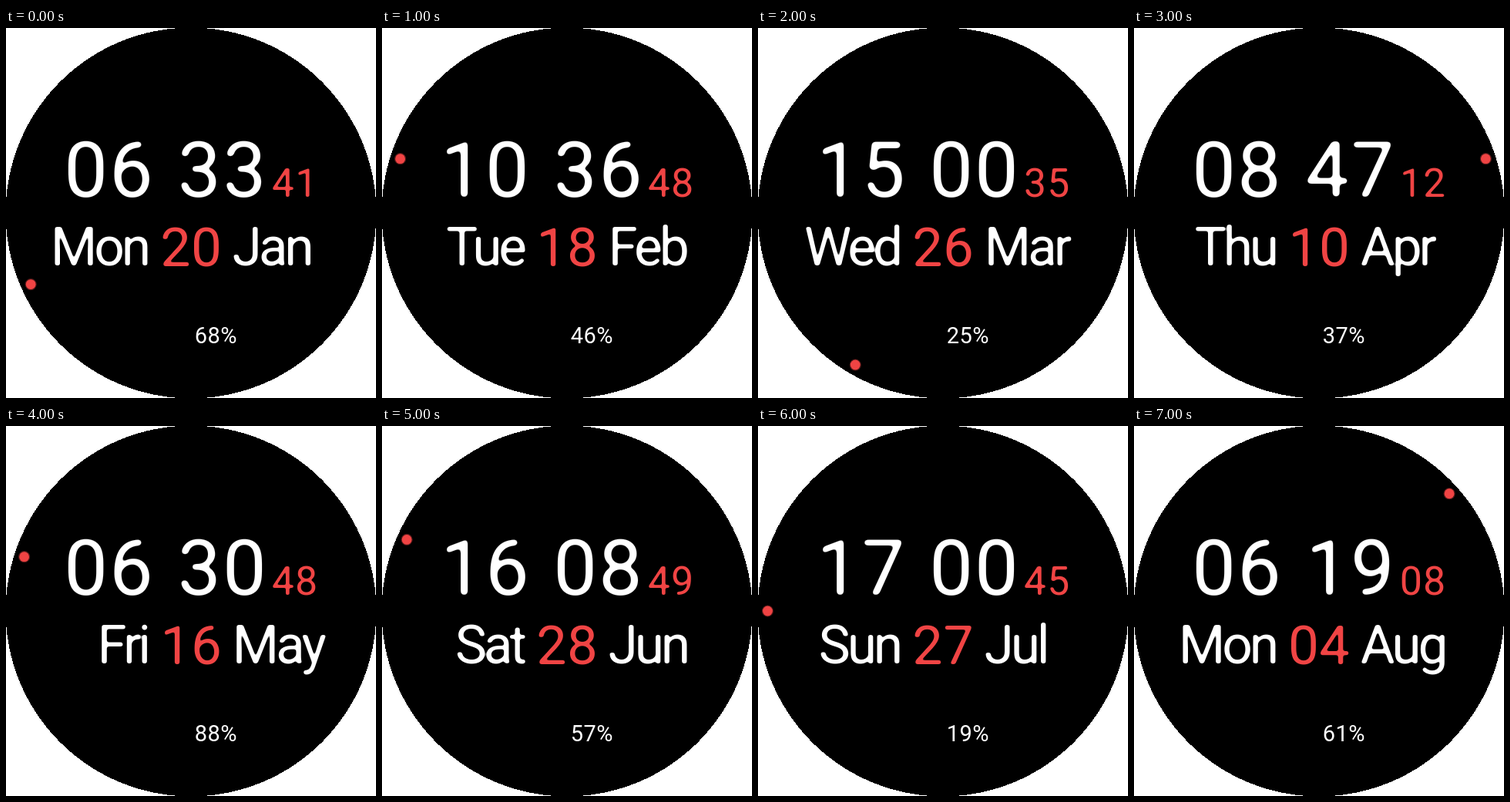
An HTML page that plays this animation: 480 by 480 pixels, repeating every 8 s.

```html
<!DOCTYPE html>
<html lang="en">
<head>
<meta charset="utf-8">
<title>Watch face</title>
<style>
  html, body { margin: 0; width: 100%; height: 100%; overflow: hidden; background: #fff; }
  svg { display: block; width: 480px; height: 480px; font-family: Roboto, sans-serif; fill: #fff; }
  .red { fill: #f04444; }
  .mid { text-anchor: middle; }
  .end { text-anchor: end; }
  .time { font-size: 101px; letter-spacing: .02em; filter: url(#round-l); }
  .date { font-size: 71px; filter: url(#round-m); }
  .word { font-size: 69.5px; letter-spacing: -.06em; }
  .secs { font-size: 52px; letter-spacing: 1px; filter: url(#round-s); }
  .power { font-size: 29px; letter-spacing: .5px; }
</style>
</head>
<body>
<svg viewBox="0 0 480 480">
  <!-- Blur and re-sharpen the alpha to round the stroke ends -->
  <defs>
    <filter id="round-l" color-interpolation-filters="sRGB">
      <feGaussianBlur stdDeviation="2.4"/>
      <feComponentTransfer><feFuncA type="linear" slope="6" intercept="-2.5"/></feComponentTransfer>
    </filter>
    <filter id="round-m" color-interpolation-filters="sRGB">
      <feGaussianBlur stdDeviation="1.6"/>
      <feComponentTransfer><feFuncA type="linear" slope="4" intercept="-1.5"/></feComponentTransfer>
    </filter>
    <filter id="round-s" color-interpolation-filters="sRGB">
      <feGaussianBlur stdDeviation="1.2"/>
      <feComponentTransfer><feFuncA type="linear" slope="3" intercept="-1"/></feComponentTransfer>
    </filter>
  </defs>
  <circle cx="240" cy="240" r="240.5" fill="#000" shape-rendering="crispEdges"/>
  <text id="hour" class="time mid" x="134" y="219"></text>
  <text id="minute" class="time mid" x="281" y="219"></text>
  <text id="second" class="secs red mid" x="375" y="219"></text>
  <text id="weekday" class="date word end" x="184" y="308"></text>
  <text id="day" class="date red mid" x="240" y="308.5"></text>
  <text id="month" class="date word" x="293.5" y="308"></text>
  <text id="battery" class="power end" x="300" y="408.5"></text>
  <circle id="dot" class="red" r="6.4" stroke="#f04444" stroke-opacity=".35" stroke-width="2.4"/>
</svg>
<script>
  const STEP = 1000;
  const FIELDS = ["hour", "minute", "second", "weekday", "day", "month", "battery"];
  const FACES = [
    "06 33 41 Mon 20 Jan 68%",
    "10 36 48 Tue 18 Feb 46%",
    "15 00 35 Wed 26 Mar 25%",
    "08 47 12 Thu 10 Apr 37%",
    "06 30 48 Fri 16 May 88%",
    "16 08 49 Sat 28 Jun 57%",
    "17 00 45 Sun 27 Jul 19%",
    "06 19 08 Mon 04 Aug 61%",
  ].map(face => face.split(" "));

  const byId = id => document.getElementById(id);
  let shown = -1;

  function show(index) {
    const face = FACES[index];
    FIELDS.forEach((id, i) => byId(id).textContent = face[i]);
    const angle = face[2] / 60 * 2 * Math.PI;
    byId("dot").setAttribute("cx", 240 + 227.5 * Math.sin(angle));
    byId("dot").setAttribute("cy", 240 - 227.5 * Math.cos(angle));
    shown = index;
  }

  const start = performance.now();
  function tick() {
    const index = Math.floor((performance.now() - start) / STEP) % FACES.length;
    if (index !== shown) show(index);
    requestAnimationFrame(tick);
  }
  tick();
</script>
</body>
</html>
```
